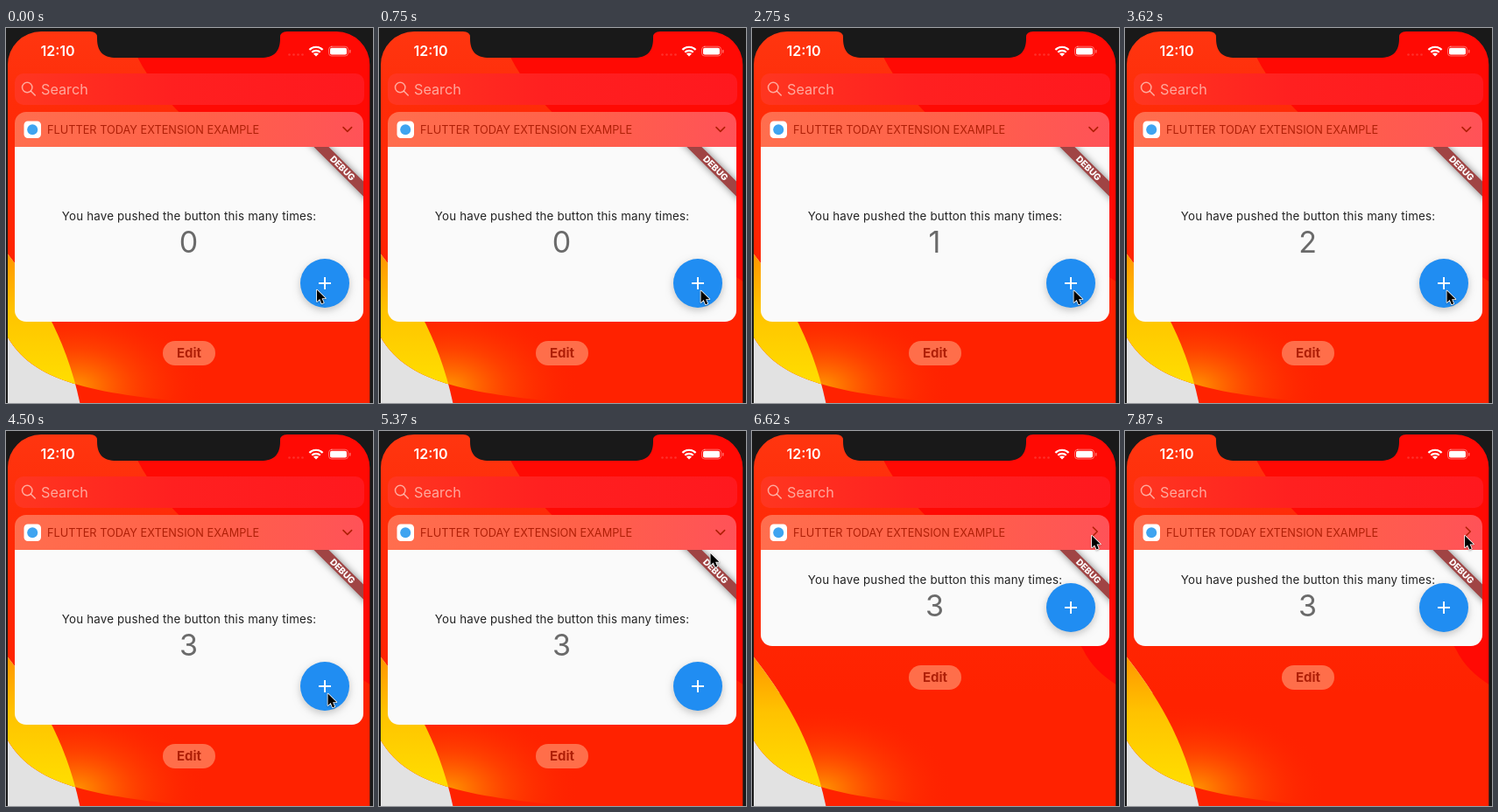
Animation, 419 px wide and 429 px high, one loop 8000 ms. Source, as an HTML page with a canvas:

```html
<!DOCTYPE html>
<html lang="en">
<head>
<meta charset="utf-8">
<title>Today extension</title>
<style>
  html, body { margin: 0; width: 100%; height: 100%; overflow: hidden; background: #1a1a1a; }
  canvas { display: block; width: 419px; height: 429px; }
</style>
</head>
<body>
<canvas id="stage"></canvas>
<script>
const W = 419, H = 429, LOOP = 8000, STEP = 125;
const canvas = document.getElementById('stage');
const ctx = canvas.getContext('2d');
const ratio = window.devicePixelRatio || 1;
canvas.width = Math.round(W * ratio);
canvas.height = Math.round(H * ratio);

const SANS = 'Inter, "Liberation Sans", sans-serif';
const DARK_RED = '#b02008';
const CARD = { x: 10, y: 96, w: 398, head: 40, open: 200, shut: 110 };
const CLICKS = [2250, 3000, 4250];
const FOLD = [5870, 6200];

// time, x, y of the pointer tip
const POINTER = [
  [0, 355, 299.5], [600, 367.5, 300.5], [4800, 367.5, 300.5],
  [5370, 379, 132.5], [5700, 388, 119.8], [LOOP, 388, 119.8]
];

const clamp = v => Math.min(1, Math.max(0, v));
const mix = (a, b, k) => a + (b - a) * k;
const smooth = k => k * k * (3 - 2 * k);
const easeOut = k => 1 - (1 - k) * (1 - k);

function roundBox(x, y, w, h, r, fill) {
  ctx.beginPath();
  ctx.roundRect(x, y, w, h, r);
  ctx.fillStyle = fill;
  ctx.fill();
}

function disc(x, y, r, fill) {
  ctx.beginPath();
  ctx.arc(x, y, r, 0, Math.PI * 2);
  ctx.fillStyle = fill;
  ctx.fill();
}

function line(points, width, color, cap = 'round') {
  ctx.beginPath();
  points.forEach(([x, y]) => ctx.lineTo(x, y));
  ctx.lineWidth = width;
  ctx.strokeStyle = color;
  ctx.lineCap = cap;
  ctx.lineJoin = 'round';
  ctx.stroke();
}

function label(text, x, y, font, color, align = 'left', spacing = 0) {
  ctx.font = font + ' ' + SANS;
  ctx.letterSpacing = spacing + 'px';
  ctx.textAlign = align;
  ctx.fillStyle = color;
  ctx.fillText(text, x, y);
}

function addStops(g, stops) {
  stops.forEach(([at, color]) => g.addColorStop(at, color));
  return g;
}

const gradient = (x0, y0, x1, y1, stops) =>
  addStops(ctx.createLinearGradient(x0, y0, x1, y1), stops);

function setShadow(color, blur, dy) {
  ctx.shadowColor = color;
  ctx.shadowBlur = blur * ratio;
  ctx.shadowOffsetY = dy * ratio;
}

// The arcs that divide the wallpaper
const redArea = new Path2D('M138 0C150 50 185 88 240 135S376 240 378 250Q390 275 419 292L419 0Z');
const steepArc = new Path2D('M0 256C34 300 68 350 85 432L0 432Z');
const aboveArc = new Path2D('M0 350C30 408 105 418 225 430L419 430L419 0L0 0Z');

function wallpaper() {
  ctx.fillStyle = gradient(0, 0, 0, 300, [[0, '#ff3610'], [0.3, '#ff2c08'], [1, '#ff2200']]);
  ctx.fillRect(0, 0, W, H);
  ctx.fillStyle = '#ff0a04';
  ctx.fill(redArea);

  ctx.fillStyle = '#e2e2e2';
  ctx.fill(steepArc);
  ctx.save();
  ctx.clip(aboveArc);
  ctx.fillStyle = '#ff2200';
  ctx.fillRect(0, 300, 250, 130);

  // glow along the shallow arc
  ctx.save();
  ctx.translate(80, 410);
  ctx.scale(1, 0.65);
  ctx.fillStyle = addStops(ctx.createRadialGradient(0, 0, 0, 0, 0, 150),
    [[0, '#ff9400'], [0.45, 'rgba(255,85,0,.6)'], [1, 'rgba(255,34,0,0)']]);
  ctx.fillRect(-150, -150, 300, 300);
  ctx.restore();

  ctx.fillStyle = gradient(0, 256, 0, 400, [[0, '#ff9400'], [0.45, '#ffc200'], [1, '#ffdc00']]);
  ctx.fill(steepArc);
  ctx.restore();
}

function statusBar() {
  label('12:10', 59, 32.3, '600 16px', '#fff', 'center');
  for (let i = 0; i < 4; i++) disc(323.5 + i * 5, 30.5, 1.3, 'rgba(255,255,255,.16)');

  // wifi
  ctx.save();
  ctx.beginPath();
  ctx.moveTo(354, 32.5);
  ctx.arc(354, 32.5, 12, -Math.PI * 0.75, -Math.PI * 0.25);
  ctx.closePath();
  ctx.clip();
  disc(354, 32.5, 4, '#fff');
  ctx.strokeStyle = '#fff';
  ctx.lineWidth = 2.3;
  for (const r of [6.7, 10.8]) {
    ctx.beginPath();
    ctx.arc(354, 32.5, r, Math.PI, Math.PI * 2);
    ctx.stroke();
  }
  ctx.restore();

  // battery
  ctx.beginPath();
  ctx.roundRect(368.5, 21.2, 22, 10.8, 3.3);
  ctx.lineWidth = 1;
  ctx.strokeStyle = 'rgba(255,255,255,.4)';
  ctx.stroke();
  roundBox(370, 22.7, 19, 7.8, 1.8, '#fff');
  roundBox(392, 24.7, 1.4, 4, 0.7, 'rgba(255,255,255,.45)');
}

function searchBar() {
  roundBox(10, 52, 399, 36, 10,
    gradient(10, 0, 409, 0, [[0, '#ff3620'], [0.45, '#ff2020'], [1, '#ff181e']]));
  const tone = 'rgba(255,215,205,.72)';
  ctx.beginPath();
  ctx.arc(24.2, 68, 5.7, 0, Math.PI * 2);
  ctx.lineWidth = 1.5;
  ctx.strokeStyle = tone;
  ctx.stroke();
  line([[28.4, 72.2], [33.2, 77]], 1.6, tone);
  label('Search', 40, 76, '400 16.2px', tone);
}

function banner() {
  ctx.save();
  ctx.translate(CARD.x + CARD.w, CARD.y + CARD.head);
  ctx.rotate(Math.PI / 4);
  setShadow('rgba(0,0,0,.5)', 8, 0);
  ctx.fillStyle = '#a04444';
  ctx.fillRect(-60, 28, 120, 12);
  setShadow('transparent', 0, 0);
  label('DEBUG', 0.5, 37.6, '800 10.2px', '#fff', 'center');
  ctx.restore();
}

function plusButton(x, y) {
  setShadow('rgba(0,0,0,.22)', 8, 3);
  disc(x, y, 28, '#208df2');
  setShadow('transparent', 0, 0);
  line([[x - 7, y], [x + 7, y]], 2, '#fff', 'butt');
  line([[x, y - 7], [x, y + 7]], 2, '#fff', 'butt');
}

function card(count, fold) {
  const { x, y, w, head } = CARD;
  const body = mix(CARD.open, CARD.shut, fold);
  const top = y + head, middle = top + body / 2;

  ctx.save();
  ctx.beginPath();
  ctx.roundRect(x, y, w, head + body, 13);
  ctx.clip();
  ctx.fillStyle = gradient(x, y, x + w, top, [[0, '#ff6e4e'], [0.55, '#ff6149'], [1, '#ff5258']]);
  ctx.fillRect(x, y, w, head);

  ctx.beginPath();
  ctx.rect(x, top, w, body);
  ctx.clip();
  ctx.fillStyle = '#fafafa';
  ctx.fillRect(x, top, w, body);
  label('You have pushed the button this many times:', 209, middle - 16, '400 13.3px', '#222', 'center', 0.2);
  label(String(count), 208.5, middle + 21, '400 34px', '#6a6a6a', 'center');
  plusButton(364, top + body - 44);
  banner();
  ctx.restore();

  roundBox(20.5, 106.5, 19.5, 19.5, 4.5, '#fff');
  disc(30.2, 116.2, 6, '#3fa4f0');
  label('FLUTTER TODAY EXTENSION EXAMPLE', 47, 121, '400 12.75px', DARK_RED);

  ctx.save();
  ctx.translate(mix(389.8, 391.8, fold), mix(116, 115, fold));
  ctx.rotate(-Math.PI / 2 * fold);
  line([[-4.8, -2.4], [0, 2.4], [4.8, -2.4]], 1.6, DARK_RED);
  ctx.restore();

  const editY = top + body + 22;
  roundBox(179, editY, 60, 28, 14, '#ff6e4a');
  label('Edit', 209, editY + 19.2, '700 15px', DARK_RED, 'center');
}

function phoneFrame() {
  ctx.fillStyle = '#191919';
  ctx.beginPath();
  ctx.rect(0, 0, W, H);
  ctx.roundRect(2, 4, 413.3, 500, 38);
  ctx.fill('evenodd');
  ctx.fill(new Path2D(
    'M96 0L96 4Q104 4 104 10.5L104 12C104 27 111 34 126 34' +
    'L291 34C306 34 313 27 313 12L313 10.5Q313 4 321 4L321 0Z'));
}

const arrow = new Path2D('M0 0L0 15L3.5 11.8L6 17.5L8.6 16.4L6.2 10.8L11 10.8Z');

function pointer(t) {
  let i = 0;
  while (i < POINTER.length - 2 && t >= POINTER[i + 1][0]) i++;
  const a = POINTER[i], b = POINTER[i + 1];
  const k = easeOut(clamp((t - a[0]) / (b[0] - a[0])));
  ctx.save();
  ctx.translate(mix(a[1], b[1], k), mix(a[2], b[2], k));
  ctx.scale(0.9, 0.9);
  setShadow('rgba(0,0,0,.3)', 2, 1);
  ctx.lineWidth = 1.8;
  ctx.lineJoin = 'round';
  ctx.strokeStyle = '#fff';
  ctx.stroke(arrow);
  setShadow('transparent', 0, 0);
  ctx.fillStyle = '#000';
  ctx.fill(arrow);
  ctx.restore();
}

function draw(t) {
  ctx.setTransform(ratio, 0, 0, ratio, 0, 0);
  const count = CLICKS.filter(c => t >= c).length;
  const fold = smooth(clamp((t - FOLD[0]) / (FOLD[1] - FOLD[0])));
  wallpaper();
  searchBar();
  card(count, fold);
  phoneFrame();
  statusBar();
  pointer(t);
}

const start = performance.now();
function tick() {
  const t = (performance.now() - start) % LOOP;
  draw(Math.floor(t / STEP) * STEP);
  requestAnimationFrame(tick);
}
tick();
</script>
</body>
</html>
```
